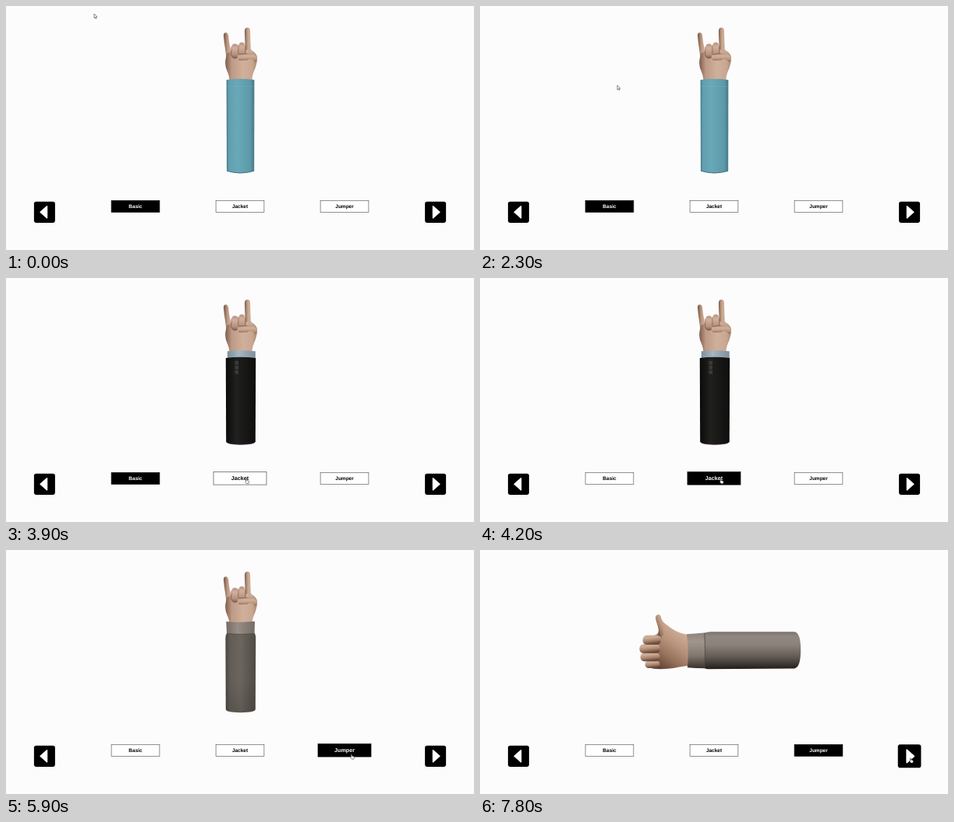
Recreate the animation shown at these times as an HTML page. Size 600 by 314 pixels, loop 8 s.

```html
<!DOCTYPE html>
<html>
<head>
<meta charset="utf-8">
<style>
html, body { margin: 0; width: 100%; height: 100%; overflow: hidden; background: #fdfcfd; }
svg { display: block; width: 600px; height: 314px; }
text { font: bold 6.5px "Liberation Sans", Arial, sans-serif; text-anchor: middle; text-rendering: geometricPrecision; }
.crease { fill: none; stroke: #6b4a3a; stroke-width: .9; stroke-linecap: round; opacity: .7; }
</style>
</head>
<body>
<svg viewBox="0 0 600 314">
  <defs>
    <linearGradient id="skin">
      <stop offset="0" stop-color="#7d5d4c"/><stop offset=".2" stop-color="#bd9a85"/>
      <stop offset=".55" stop-color="#d0b09b"/><stop offset=".85" stop-color="#c8a791"/><stop offset="1" stop-color="#a88571"/>
    </linearGradient>
    <linearGradient id="digit">
      <stop offset="0" stop-color="#725443"/><stop offset=".35" stop-color="#b8957f"/>
      <stop offset=".7" stop-color="#d2b09a"/><stop offset="1" stop-color="#b08c77"/>
    </linearGradient>
    <linearGradient id="curl" x2="0" y2="1">
      <stop offset="0" stop-color="#b8947f"/><stop offset=".3" stop-color="#d2b09b"/><stop offset=".75" stop-color="#b5917c"/>
      <stop offset="1" stop-color="#7c5b4a"/>
    </linearGradient>
    <linearGradient id="fist" gradientUnits="userSpaceOnUse" x1="258" y1="104" x2="226" y2="150">
      <stop offset="0" stop-color="#cfae98"/><stop offset=".35" stop-color="#b8937c"/>
      <stop offset=".7" stop-color="#916c57"/><stop offset="1" stop-color="#5f4131"/>
    </linearGradient>
    <linearGradient id="thumbTone" gradientUnits="userSpaceOnUse" x1="225" y1="100" x2="239" y2="94">
      <stop offset="0" stop-color="#7b5a47"/><stop offset=".5" stop-color="#b9947d"/><stop offset="1" stop-color="#cfac95" stop-opacity="0"/>
    </linearGradient>
    <linearGradient id="knuckle" x2=".25" y2="1">
      <stop offset="0" stop-color="#c8a690"/><stop offset=".3" stop-color="#cfad97"/><stop offset=".65" stop-color="#a9846e"/>
      <stop offset="1" stop-color="#644536"/>
    </linearGradient>
    <linearGradient id="blue">
      <stop offset="0" stop-color="#47798a"/><stop offset=".09" stop-color="#619fae"/><stop offset=".4" stop-color="#69a8b8"/>
      <stop offset=".85" stop-color="#5c99a9"/><stop offset="1" stop-color="#457886"/>
    </linearGradient>
    <linearGradient id="black">
      <stop offset="0" stop-color="#0b0b0a"/><stop offset=".35" stop-color="#20201e"/><stop offset="1" stop-color="#0e0e0d"/>
    </linearGradient>
    <linearGradient id="shirt">
      <stop offset="0" stop-color="#7e8e9b"/><stop offset=".4" stop-color="#a6b7c4"/><stop offset="1" stop-color="#7f909d"/>
    </linearGradient>
    <linearGradient id="wool">
      <stop offset="0" stop-color="#4a4540"/><stop offset=".15" stop-color="#635c56"/><stop offset=".5" stop-color="#6c655f"/>
      <stop offset="1" stop-color="#4f4a45"/>
    </linearGradient>
    <linearGradient id="rib">
      <stop offset="0" stop-color="#746b64"/><stop offset=".4" stop-color="#978d85"/><stop offset="1" stop-color="#756c65"/>
    </linearGradient>
    <linearGradient id="woolSide" x2="0" y2="1">
      <stop offset="0" stop-color="#79716b"/><stop offset=".12" stop-color="#8f8780"/><stop offset=".35" stop-color="#8a827b"/>
      <stop offset=".65" stop-color="#655d57"/><stop offset=".9" stop-color="#37312d"/><stop offset="1" stop-color="#211d1a"/>
    </linearGradient>
    <linearGradient id="ribSide" x2="0" y2="1">
      <stop offset="0" stop-color="#8f857d"/><stop offset=".25" stop-color="#a1968d"/><stop offset=".65" stop-color="#81776f"/>
      <stop offset="1" stop-color="#38312c"/>
    </linearGradient>
    <linearGradient id="foot" x2="0" y2="1">
      <stop offset=".6" stop-opacity="0"/><stop offset="1" stop-opacity=".12"/>
    </linearGradient>
  </defs>

  <g id="horns">
    <path fill="url(#digit)" d="M283 72C282 59 279.5 47 279 38Q278.8 34.3 281.7 34.2Q284.6 34.2 285.1 38C285.8 46 287 54 290 60L292 68Z"/>
    <path fill="url(#digit)" d="M306.8 62C307 50 306 40 306 32Q306.2 27.8 309.6 27.8Q312.9 27.9 313 32C313.2 42 313.3 52 314.3 62Z"/>
    <path fill="url(#skin)" d="M283.3 61C281.6 67 280.7 71 281.4 76C282 83 286.3 86 286.6 97H315.4C315.4 87 319 83 320.4 77C321.6 73 322.6 69 321.8 65C321 61 317 58 313.5 56L290 58Z"/>
    <path fill="url(#curl)" d="M288.8 63L289.2 52Q290 48.5 293.4 48.4Q297 48.5 297.6 52L298.4 65Q296.6 68.2 293.2 67.4Q289.8 66.8 288.8 63Z"/>
    <path fill="url(#curl)" d="M298 64L298 51Q298.8 47 302.3 46.8Q305.9 47 306.6 51L307.4 61Q307 66 302.8 66.4Q299 66.6 298 64Z"/>
    <path fill="url(#curl)" d="M321.6 66C319 61.5 314 60 309 61.2L299.6 62.4Q296.2 63.7 296.9 66.5Q297.8 69.2 301.5 69L312 68.4C316 69 318.4 70 319.4 72Q322 70 321.6 66Z"/>
    <path class="crease" d="M298.5 69.2Q304 70 310 68.8M297.8 51V61.5M306.9 52V60.5M289 53L288.8 63Q289.8 66.8 293 67.4M299 62.4L309 61.1"/>
  </g>

  <g id="basic">
    <path fill="url(#blue)" d="M282.6 95Q300 92.4 318.4 95L318.2 212.3Q300.5 218 283 212.3Z"/>
    <path d="M282.8 103.3H318.2" stroke="#80b7c6" stroke-width=".6" opacity=".6"/>
    <path d="M283.2 212.3Q300.5 217.6 318 212.3" fill="none" stroke="#39616d" stroke-width=".8"/>
  </g>

  <g id="jacket">
    <path fill="url(#shirt)" d="M283.8 94.3Q300 92.4 319.8 94.3V104H283.8Z"/>
    <path fill="url(#black)" d="M281.8 103Q300 100.4 320.2 103L319.8 210.3Q319 214.2 300.8 214.4Q283 214.2 282.2 210.3Z"/>
    <path d="M282.6 211.2Q285 214.2 300.8 214.2Q317 214.2 319.4 211.2" fill="none" stroke="#4a2c40" stroke-width=".7"/>
    <path d="M293.4 106.8h4.6v4.6h-4.6zM293.4 112.8h4.6v4.6h-4.6zM293.4 118.8h4.6v4.6h-4.6z" fill="#3b3b38"/>
  </g>

  <g id="jumper">
    <path fill="url(#wool)" d="M283 107H318.6Q320.2 109 320.2 114L319.8 205Q319.4 209 300.6 209.2Q282 209 281.8 205L281.4 114Q281.5 109 283 107Z"/>
    <path fill="url(#foot)" d="M281.4 107H320.2L319.8 205Q319.4 209 300.6 209.2Q282 209 281.8 205Z"/>
    <path fill="url(#rib)" d="M282.3 92Q300 94 319 91.8L318.6 107.4Q300 109 283 107.4Z"/>
    <path d="M283 107.7Q300 109.3 318.6 107.7" fill="none" stroke="#504a45" stroke-width=".8"/>
  </g>

  <g id="thumb">
    <path id="hand" fill="url(#fist)" d="M225.2 87Q225.6 83.1 229 83.2Q231.6 83.4 232.2 87C233.4 93 238 95 243 99C249 104 258 108 268 109V149C256 149.5 247 153 236 153Q224 154 216 151L217 111Q228 110 229 105C229.4 99 225.6 93 225.2 87Z"/>
    <path fill="url(#thumbTone)" d="M225.2 87Q225.6 83.1 229 83.2Q231.6 83.4 232.2 87C233.4 93 238 95 243 99L234 111H226Q229 108 229 105C229.4 99 225.6 93 225.2 87Z"/>
    <path class="crease" d="M229 105Q230 110 233 113"/>
    <g fill="url(#knuckle)">
      <rect x="211.6" y="142.4" width="19" height="9.6" rx="4.6"/>
      <rect x="205.6" y="132.3" width="25" height="11" rx="5.2"/>
      <rect x="204.4" y="121.2" width="26.4" height="11.6" rx="5.4"/>
      <rect x="208.6" y="109.8" width="23.2" height="12" rx="5.4"/>
    </g>
    <path fill="url(#woolSide)" d="M287 107Q291 105.3 296 105.3L403 105.2Q411.2 106 411.2 129Q411 151.5 403 152.4L292 153.3Q288 153 287 151Z"/>
    <path fill="url(#ribSide)" d="M265 108.2Q276 108 287.6 106.6Q289.3 129 287.6 152.2Q277 152 266 151.2Q267.8 130 265 108.2Z"/>
    <path d="M287.8 106.6Q289.5 129 287.8 152.4" fill="none" stroke="#4d4742" stroke-width=".8"/>
  </g>

  <g id="buttons"></g>
  <g id="arrows"></g>
  <g id="cursor" stroke="#2b2b2b" stroke-width=".55" fill="#fff" stroke-linejoin="round">
    <path id="pointer" d="M0 0V5.6L1.3 4.5L2.1 6.3L3 5.9L2.2 4.1H3.9Z"/>
    <path id="finger" d="M.4 .6Q1 -.3 1.5 .6V2.6L4 3.2Q4.6 3.5 4.4 4.6L3.9 6.6H1.4L-.4 4.2Q-.1 3.4 .4 3.9Z"/>
  </g>
</svg>
<script>
const $ = id => document.getElementById(id);
const LOOP = 8000, TO_JACKET = 3900, TO_JUMPER = 5300, NEXT = 7100;

// hover: [enter, leave]; active: [selected, deselected]
const buttons = [
  { label: 'Basic', x: 166, hover: [9e3, 9e3], active: [-1e3, TO_JACKET] },
  { label: 'Jacket', x: 300, hover: [3500, 4330], active: [TO_JACKET, TO_JUMPER] },
  { label: 'Jumper', x: 434, hover: [4720, 6030], active: [TO_JUMPER, 9e3] }
];
const next = { hover: [6420, 9e3] };

// cursor way points: time, x, y
const way = [
  [0, 113, 10], [420, 113, 10], [520, 110.5, 8], [600, 117, 4.5], [700, 129, 5.5], [800, 138.5, 7.5],
  [950, 138.5, 7.5], [1200, 215, 38], [1500, 340, 40], [1800, 416, 17], [1900, 417, 24],
  [2100, 290, 72], [2300, 176, 102], [2500, 180, 112], [2700, 207, 118.5], [3000, 243, 160],
  [3400, 287.6, 244], [3600, 302, 256], [3800, 307, 258], [4200, 307.5, 258], [4350, 338, 264],
  [4500, 383, 266], [4700, 408, 263], [5000, 426, 258], [5300, 434, 259], [5450, 438, 260],
  [5700, 438, 260], [5900, 441.8, 262.5], [6100, 475, 267], [6400, 535, 270], [6600, 549.5, 268],
  [6800, 551, 267.5], [8000, 551, 267.5]
];

const ramp = (t, start, span) => {
  const p = Math.min(1, Math.max(0, (t - start) / span));
  return p * p * (3 - 2 * p);
};
const pulse = (t, [on, off], span) => ramp(t, on, span) - ramp(t, off, span);
const grey = v => `rgb(${v},${v},${v})`;
const show = (id, on) => $(id).style.display = on ? '' : 'none';
const grow = (el, x, y, amount) =>
  el.setAttribute('transform', `translate(${x} ${y}) scale(${1 + .1 * amount})`);

$('buttons').innerHTML = buttons.map(b =>
  `<g><rect x="-30.9" y="-7.5" width="61.8" height="15" stroke-width=".65"/>
  <text y="2.3">${b.label}</text></g>`).join('');
$('arrows').innerHTML = [-1, 1].map(dir =>
  `<g transform="translate(${300 + dir * 250.6} 265.3)"><rect x="-13.5" y="-13.6" width="27" height="27.2" rx="2.8"/>
  <path transform="scale(${dir} 1)" d="M-3.1 -7.5L5.3 0L-3.1 7.5Z" fill="#fff" stroke="#fff" stroke-width="1.5" stroke-linejoin="round"/></g>`).join('');
buttons.forEach((b, i) => b.el = $('buttons').children[i]);
next.el = $('arrows').children[1];

function cursorAt(t) {
  let i = 1;
  while (i < way.length - 1 && way[i][0] < t) i++;
  const a = way[i - 1], b = way[i], p = (t - a[0]) / (b[0] - a[0]);
  return [1, 2].map(k => a[k] + (b[k] - a[k]) * p);
}

function draw(t) {
  show('horns', t < NEXT);
  show('basic', t < TO_JACKET);
  show('jacket', t >= TO_JACKET && t < TO_JUMPER);
  show('jumper', t >= TO_JUMPER && t < NEXT);
  show('thumb', t >= NEXT);

  for (const b of buttons) {
    const dark = pulse(t, b.active, 300), [box, label] = b.el.children;
    grow(b.el, b.x, 257.8, pulse(t, b.hover, 200));
    box.style.fill = grey(Math.round(254 * (1 - dark)));
    box.style.stroke = grey(Math.round(85 * (1 - dark)));
    label.style.fill = grey(Math.round(255 * dark));
  }
  grow(next.el, 550.6, 265.3, pulse(t, next.hover, 200));

  const over = [...buttons, next].some(({ hover: [on, off] }) => t >= on && t < off);
  show('pointer', !over);
  show('finger', over);
  $('cursor').setAttribute('transform', `translate(${cursorAt(t)})`);
}

const start = performance.now();
function tick() {
  draw((performance.now() - start) % LOOP);
  requestAnimationFrame(tick);
}
tick();
</script>
</body>
</html>
```
